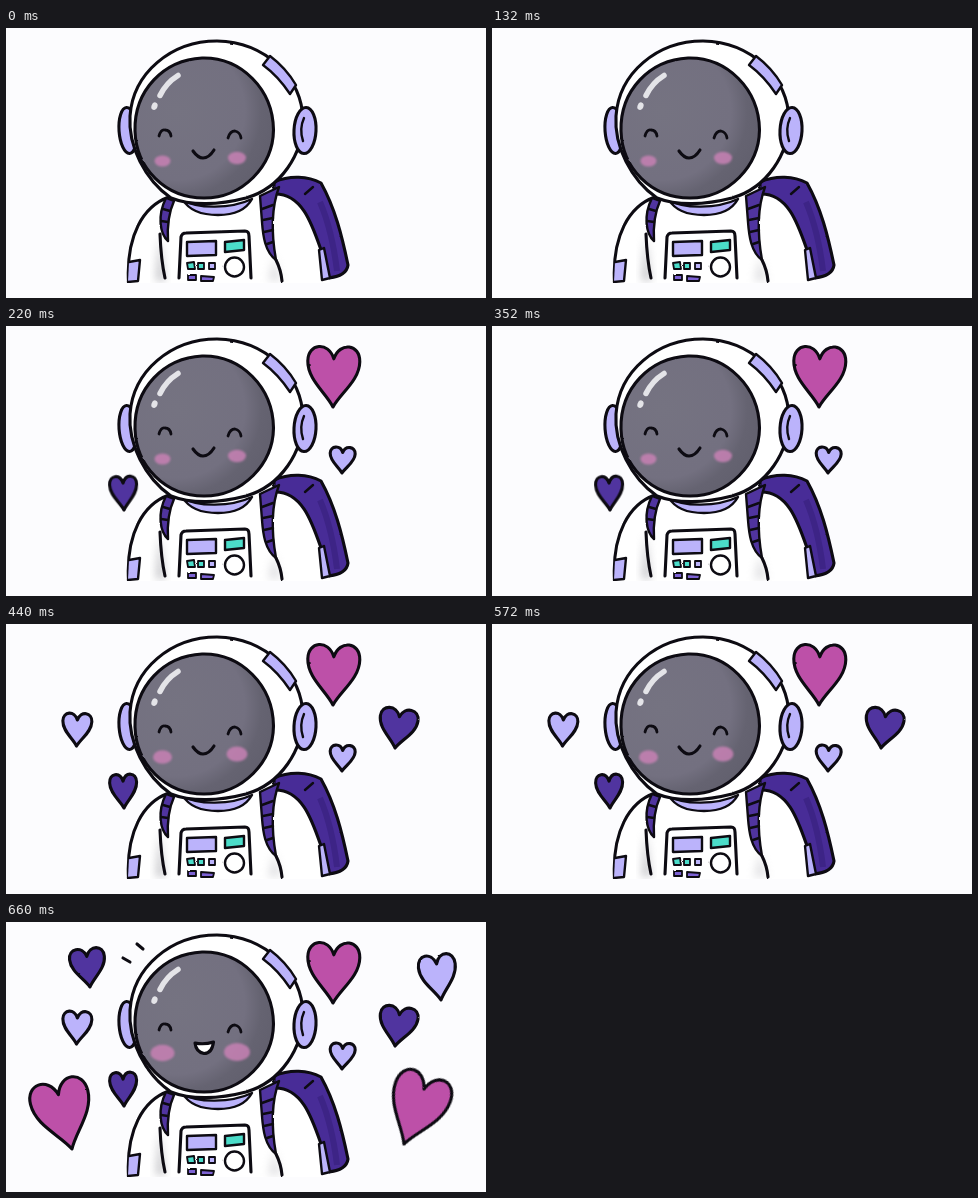
These frames come from a looping animation (480x270 px, 880 ms). An HTML page:

```html
<!DOCTYPE html>
<html lang="en">
<head>
<meta charset="utf-8">
<title>Happy astronaut</title>
<style>
  html, body { margin: 0; width: 100%; height: 100%; overflow: hidden; background: #fcfcfe; }
  svg { display: block; width: 100vw; height: 100vh; }
  .ink { stroke: #0d0b12; stroke-width: 3.1; stroke-linecap: round; stroke-linejoin: round; }
  .thin { stroke-width: 2.4; }
  .line { fill: none; }
  .white { fill: #fff; }
  .lilac { fill: #bbb3fb; }
  .violet { fill: #7d62d4; }
  .purple { fill: #50349f; }
  .teal { fill: #4bdcc9; }
  .pink { fill: #bd50a8; }
  .heart path { vector-effect: non-scaling-stroke; }
</style>
</head>
<body>
<svg viewBox="0 0 480 270" preserveAspectRatio="none">
  <defs>
    <filter id="rough" filterUnits="userSpaceOnUse" x="0" y="0" width="480" height="270" color-interpolation-filters="sRGB">
      <feTurbulence type="fractalNoise" baseFrequency=".14" numOctaves="2" seed="4"/>
      <feDisplacementMap in="SourceGraphic" scale="1.5" xChannelSelector="R" yChannelSelector="G"/>
    </filter>
    <filter id="soft" x="-60%" y="-60%" width="220%" height="220%"><feGaussianBlur stdDeviation="4"/></filter>
    <filter id="blush" x="-30%" y="-30%" width="160%" height="160%"><feGaussianBlur stdDeviation=".8"/></filter>
    <radialGradient id="glass" cx=".3" cy=".38" r=".85">
      <stop offset="0" stop-color="#757381"/>
      <stop offset=".58" stop-color="#737080"/>
      <stop offset=".72" stop-color="#656371"/>
      <stop offset="1" stop-color="#5f5d6b"/>
    </radialGradient>
    <clipPath id="ground"><rect width="480" height="255"/></clipPath>
  </defs>

  <g filter="url(#rough)">
    <g clip-path="url(#ground)">
      <!-- backpack -->
      <path class="ink" fill="#482c97" d="M268 154C284 147 302 148 315 155C329 180 336 208 342 237C341 245 333 249 322 250L268 170Z"/>
      <path class="line" stroke="#3d2486" stroke-width="6" d="M314 174C323 195 328 218 331 243"/>
      <path class="ink thin line" d="M299 166L307 159"/>

      <!-- suit -->
      <path class="white" d="M164 168C138 178 122 205 122 255H324L315 222C306 196 296 165 268 166Z"/>
      <path d="M154 208L159 253H150Q151 228 154 208Z" fill="#a7a7ad" opacity=".65" filter="url(#soft)"/>
      <path d="M268 228L275 253H262Z" fill="#b5b5bb" opacity=".4" filter="url(#soft)"/>
      <path class="ink line" d="M163 169C137 178 120 208 122.500 254"/>
      <path class="ink line" d="M268 166C296 165 306 196 315 222"/>
      <path class="ink thin lilac" d="M123 234L134 232L132 253L122 254"/>
      <path class="ink thin lilac" d="M313 222L318 220L324 250L316 252Z"/>
      <path class="ink line" d="M154 206Q155 232 159 250M270 232Q275 242 276 253"/>

      <!-- straps -->
      <path class="ink thin purple" d="M160 170L168 173C163 184 161 196 162 213C154 206 151 188 160 170Z"/>
      <path class="ink thin purple" d="M254 168L273 159C266 178 265 204 270 232C259 224 257 208 256 194Z"/>
      <path class="ink thin line" d="M157 181L164 183M155 193L162 194M256 181L267 177M257 192L267 190M258 204L267 202M261 216L267 214"/>

      <!-- collar -->
      <path class="ink thin lilac" d="M177 172C191 181 225 181 246 171C240 182 228 187 212 187C196 187 183 182 177 172Z"/>

      <!-- control panel -->
      <path class="ink white" d="M173 250L175 209Q176 205 180 205L239 203Q243 203 243 208L245 250"/>
      <path class="ink thin lilac" d="M181 214L210 213L210 227L181 228Z"/>
      <path class="ink thin teal" d="M219 214L238 212V222L219 224Z"/>
      <g class="ink" style="stroke-width:1.8">
        <path class="teal" d="M181 235L188 234L189 241L182 241ZM192 235H198V241H192Z"/>
        <path class="lilac" d="M203 235H209V241H203Z"/>
        <path class="violet" d="M182 247H190V252H182ZM195 248L208 249L207 253H195Z"/>
      </g>
      <circle class="ink thin white" cx="228.500" cy="239" r="9.500"/>
    </g>

    <!-- helmet -->
    <ellipse class="ink lilac" cx="122" cy="102.500" rx="9" ry="23" transform="rotate(-4 122 102)"/>
    <path class="ink white" d="M165 170C139 152 122 118 124 88C127 45 165 13 211 13C260 14 296 50 297 92C297 126 275 160 240 170C213 177 185 178 165 170Z"/>
    <path class="ink thin lilac" d="M264 28Q280 40 290 57L284 66Q272 48 257 37Z"/>
    <ellipse class="ink lilac" cx="299" cy="102.500" rx="11" ry="23" transform="rotate(3 299 102.500)"/>
    <path class="ink thin line" d="M298 90Q293 101 297 113"/>
    <path class="ink" fill="url(#glass)" d="M196 30C235 29 267 61 267.500 102C267 138 237 170 198 170C159 170 130 140 129 103C128 62 158 32 196 30Z"/>
    <path class="line" stroke="#e4e4e8" stroke-width="5.500" stroke-linecap="round" d="M154 67.500Q160 55 172 47.500"/>
    <ellipse cx="148.500" cy="78" rx="3" ry="3.800" fill="#e4e4e8" transform="rotate(20 148 78)"/>

    <!-- face -->
    <g fill="#c781b4" opacity=".86" filter="url(#blush)">
      <ellipse id="cheekL"/><ellipse id="cheekR"/>
    </g>
    <path class="ink line" style="stroke-width:2.800" d="M153 108Q155 101 159 102Q164 102 165 108M222 110Q224 103 229 103Q234 104 235 110"/>
    <path id="smile" class="ink line" d="M187 123Q192 130 197 130Q203 130 208 122"/>
    <path id="laugh" class="ink white" d="M189 121Q198 123 207.500 120Q206 131.500 198 131.500Q190 130 189 121Z"/>

    <g id="hearts"></g>
    <path id="marks" class="ink line" d="M117 36L124 40M131 22L137 27"/>
  </g>
</svg>

<script>
const STEP = 220, STEPS = 4;
const $ = id => document.getElementById(id);
const HEART = "M0 0C-.14-.23-.5-.44-.5-.75C-.5-1.04-.11-1.08 0-.79C.11-1.08.5-1.04.5-.75C.5-.44.14-.23 0 0Z";

// first step, colour, tip x, tip y, width, height, tilt
const hearts = [
  [1, "pink", 327, 81, 52, 61, 1],
  [1, "lilac", 336, 147, 25, 26, 2],
  [1, "purple", 118, 184, 27, 34, -2],
  [2, "lilac", 70.5, 122, 29, 33, 2],
  [2, "purple", 389, 124, 38, 40, 8],
  [3, "purple", 84, 65, 35, 39, -6],
  [3, "pink", 66, 227, 59, 71, -14],
  [3, "lilac", 435, 78, 37, 46, -7],
  [3, "pink", 398, 222, 58, 74, 20]
].map(([from, color, x, y, w, h, tilt]) => {
  const node = document.createElementNS("http://www.w3.org/2000/svg", "g");
  node.setAttribute("class", "heart");
  node.innerHTML = `<path class="ink ${color}" d="${HEART}" transform="translate(${x} ${y}) rotate(${tilt}) scale(${w} ${h})"/>`;
  $("hearts").append(node);
  return { from, node };
});

// cheek radii per step
const blush = [[8, 5.5], [8, 5.5], [9.5, 6.7], [12, 8.2]];

function show(node, on) {
  node.style.display = on ? "" : "none";
}

function ellipse(node, cx, cy, rx, ry) {
  Object.entries({ cx, cy, rx, ry }).forEach(([key, value]) => node.setAttribute(key, value));
}

function draw(time) {
  const step = Math.floor(time / STEP) % STEPS;
  const happy = step === STEPS - 1;
  const [rx, ry] = blush[step];
  hearts.forEach(({ from, node }) => show(node, step >= from));
  show($("smile"), !happy);
  show($("laugh"), happy);
  show($("marks"), happy);
  ellipse($("cheekL"), 156.5, happy ? 131 : 133, rx, ry);
  ellipse($("cheekR"), 231, 130, rx + 1, ry + .7);
}

let start;
function tick(now) {
  start ??= now;
  draw(now - start);
  requestAnimationFrame(tick);
}
draw(0);
requestAnimationFrame(tick);
</script>
</body>
</html>
```
